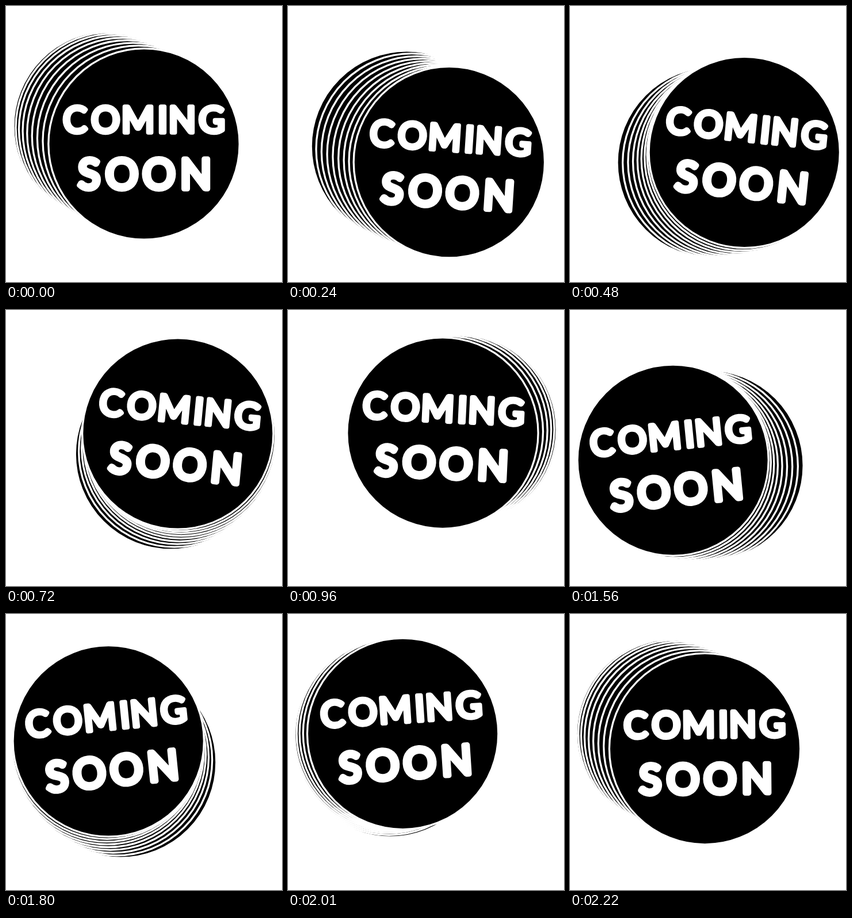
These frames come from a looping animation (480x480 px, 2250 ms). An HTML page:

```html
<!DOCTYPE html>
<html lang="en">
<head>
<meta charset="utf-8">
<title>Coming soon</title>
<style>
  html, body { margin: 0; width: 100%; height: 100%; overflow: hidden; background: #fff; }
  svg { display: block; width: 100vw; height: 100vh; }
  circle { fill: #000; stroke: #fff; stroke-width: 3.3; }
  text {
    font-family: Lato, sans-serif;
    font-weight: 400;
    text-anchor: middle;
    fill: #fff;
    stroke: #fff;
    stroke-linejoin: round;
  }
</style>
</head>
<body>
<svg viewBox="0 0 480 480">
  <g id="discs"></g>
  <g id="label">
    <text x="-120 -67 -10.5 32.4 66.3 118" y="-20.3" font-size="62" stroke-width="7.5">COMING</text>
    <text x="-95.5 -38.5 26 90" y="77.5" font-size="71" stroke-width="9">SOON</text>
  </g>
</svg>
<script>
const LOOP = 2250;
const COPIES = 8;
const STEP = 8.7 * Math.PI / 180;
const CENTER = 240;
const TILT = 6;

const discs = document.getElementById("discs");
const label = document.getElementById("label");

// Index 0 is the front disc, so it is appended last.
const rings = [];
for (let k = COPIES; k >= 0; k--) {
  const ring = document.createElementNS("http://www.w3.org/2000/svg", "circle");
  ring.setAttribute("r", 166.2);
  discs.append(ring);
  rings[k] = ring;
}

// Figure eight; each copy trails by the same phase on both axes.
function place(angle, lag) {
  return [
    CENTER + 65 * Math.sin(angle - lag),
    CENTER + 32.5 * Math.sin(2 * angle - lag)
  ];
}

function draw(ms) {
  const angle = (ms % LOOP) / LOOP * 2 * Math.PI;
  rings.forEach((ring, k) => {
    const [x, y] = place(angle, k * STEP);
    ring.setAttribute("cx", x);
    ring.setAttribute("cy", y);
  });
  const [x, y] = place(angle, 0);
  const tilt = TILT * Math.sin(angle);
  label.setAttribute("transform", `translate(${x} ${y}) rotate(${tilt})`);
}

let start;
function tick(now) {
  start ??= now;
  draw(now - start);
  requestAnimationFrame(tick);
}
draw(0);
requestAnimationFrame(tick);
</script>
</body>
</html>
```
